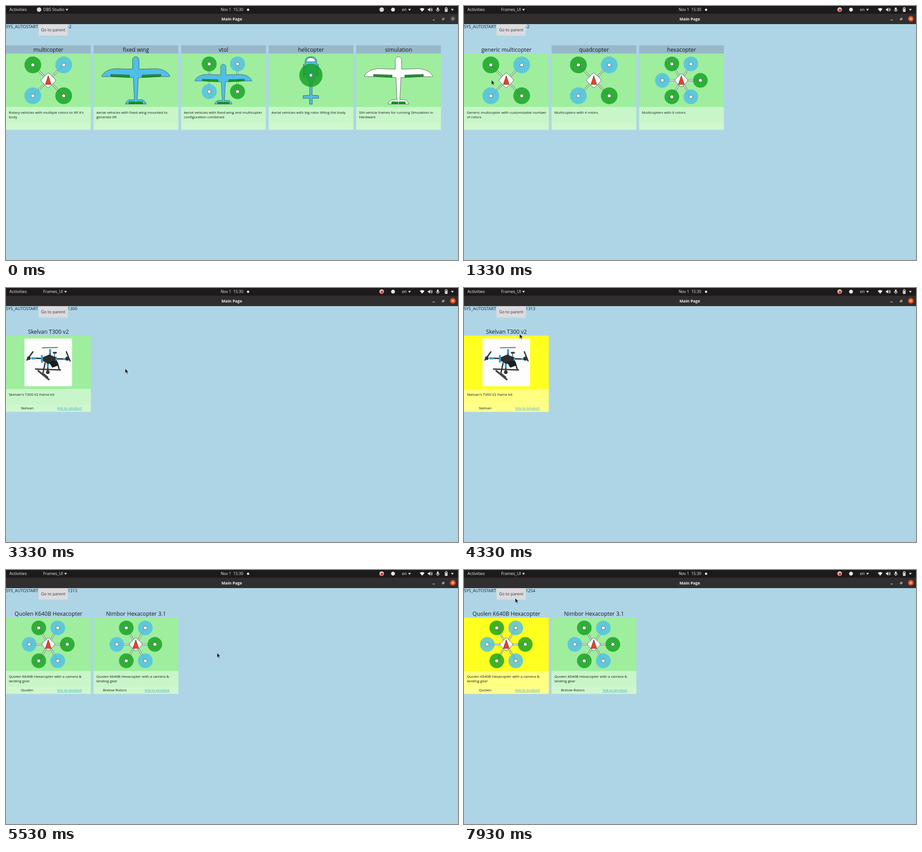
An HTML page for the animation above (8000 ms loop, 998 by 561 pixels).

```html
<!DOCTYPE html>
<html lang="en">
<head>
<meta charset="utf-8">
<title>Main Page</title>
<style>
html, body { margin: 0; width: 100%; height: 100%; overflow: hidden; background: #aed5e6; }
svg { display: block; width: 100vw; height: 100vh; }
text { font-family: "Open Sans", "Noto Sans", sans-serif; fill: #15191b; white-space: pre; }
.bar text { fill: #f0efee; }
.ink { stroke: #25332c; stroke-width: .7; stroke-linejoin: round; }
</style>
</head>
<body>
<svg id="stage" viewBox="0 0 998 561" preserveAspectRatio="none"></svg>
<script>
const LOOP = 8000, STEP = 1000 / 15;
const GREEN = '#16a020', BLUE = '#4fbfe8', LIME = '#9eee9e', YELLOW = '#ffff20';

const text = (x, y, size, str, attrs = '') =>
  `<text x="${x}" y="${y}" font-size="${size}" ${attrs}>${str}</text>`;
const centred = (x, y, size, str, attrs = '') => text(x, y, size, str, `text-anchor="middle" ${attrs}`);
const rect = (x, y, w, h, fill, attrs = '') =>
  `<rect x="${x}" y="${y}" width="${w}" height="${h}" fill="${fill}" ${attrs}/>`;
const circle = (x, y, r, fill, attrs = '') => `<circle cx="${x}" cy="${y}" r="${r}" fill="${fill}" ${attrs}/>`;
const path = (d, fill, attrs = '') => `<path d="${d}" fill="${fill}" ${attrs}/>`;
const group = (inner, attrs) => `<g ${attrs}>${inner}</g>`;
const arrowDown = x => path(`M${x - 3},6.5h6l-3,4z`, '#f0efee');

// Vehicle icons, centred on x = 0
const rotor = (x, y, r, fill) =>
  circle(x, y, r, fill, 'opacity=".81"') + circle(x, y, 3.9, '#fff', 'class="ink"');
const arm = (x1, y1, x2, y2) => {
  const d = `M${x1},${y1}L${x2},${y2}`;
  return path(d, 'none', 'stroke="#34503c" stroke-width="3.6"') +
    path(d, 'none', 'stroke="#e6f5e6" stroke-width="2.2"');
};

function copter(count) {
  const quad = count === 4, reach = quad ? 48.2 : 42, size = quad ? 18.5 : 16.2;
  let arms = '', rotors = '';
  for (let i = 0; i < count; i++) {
    const a = (i + (quad ? .5 : 0)) * 2 * Math.PI / count;
    const x = reach * Math.cos(a), y = 164.2 + reach * Math.sin(a);
    arms += arm(0, 164.2, x, y);
    rotors += rotor(x, y, size, i % 2 ? BLUE : GREEN);
  }
  const half = quad ? 12.3 : 11;
  const body = rect(-half, -half, 2 * half, 2 * half, '#fff', 'rx="3.5" class="ink" transform="rotate(45)"') +
    path('M0,-10.5L6.5,9H-6.5Z', '#f43c22', 'class="ink"');
  return arms + rotors + group(body, 'transform="translate(0 164.2)"');
}

function plane(fill) {
  const half = s => `<g transform="scale(${s} 1)">` +
    path('M14,152.5L55,151V155.5L14,157.5Z', GREEN, 'class="ink"') +
    path('M1,211.5H15V216H1Z', GREEN, 'class="ink"') + '</g>';
  return path('M0,112C4,112 7,115 7,120V139.5L42,138.5C58,138.5 69,144 75,154Q76,156 73,156L55,156L14,158H5.5L3,207H14' +
    'Q20,208.500 23,216.500H-23Q-20,208.500 -14,207H-3L-5.500,158H-14L-55,156H-73Q-76,156 -75,154' +
    'C-69,144 -58,138.500 -42,138.500L-7,139.500V120C-7,115 -4,112 0,112Z', fill, 'class="ink"') + half(1) + half(-1);
}

function vtol() {
  let arms = '', rotors = '';
  for (const x of [-31.3, 31.3]) {
    arms += arm(x, 128, x, 189);
    rotors += rotor(x, 128, 16.6, x < 0 ? GREEN : BLUE) + rotor(x, 189, 16.6, x < 0 ? BLUE : GREEN);
  }
  return arms + group(plane(BLUE), 'transform="translate(0 34.700) scale(.84)"') + rotors;
}

function helicopter() {
  const skid = x => path(`M${x},128V157M${x},135H0M${x},151H0`, 'none', 'stroke="#2f6f8c" stroke-width="1.800"');
  return skid(-16) + skid(16) +
    path('M-13,125C-13,115 -8,112 0,112S13,115 13,125V147C13,158 5,161 3,170L2.500,197L17,198V204L3,203.500V217H-3V203.500L-17,204V198L-2.500,197L-3,170C-5,161 -13,158 -13,147Z', BLUE, 'class="ink"') +
    path('M-10,123C-9,116 -5,114.500 0,114.500S9,116 10,123Z', '#fff', 'class="ink"') +
    circle(0, 153, 25.7, GREEN, 'opacity=".81"') + circle(0, 153, 3.7, '#fff', 'class="ink"');
}

function kitPhoto() {
  const line = (d, color, w) => path(d, 'none', `stroke="${color}" stroke-width="${w}" stroke-linecap="round"`);
  return rect(-52.5, 111.5, 105, 105.5, '#fdfdfd') +
    line('M-36,155L42,157M4,138V150M-1,160V184M-7,166L-12,189M20,165L24,179', '#33363b', 3) +
    line('M-36,155.500L-29,155.500M35,157H41M4,137V142M-1,165V173M-14,150V163M17,154V160', '#2ba6dc', 4.5) +
    line('M-13,132L20,131.500', '#7d8587', 2.5) +
    line('M-47,159L-34,141M40,141L48,161M-28,179L27,181', '#3b3a3c', 3) +
    line('M-22,183L1,202M-12,189L-2,197', '#4a4342', 4) +
    path('M-12,153L2,147L17,153L15,164L0,168L-12,161Z', '#2c2e32') +
    path('M1,163L19,160L22,171L9,176Z', '#1d1d20') +
    rect(10, 141, 9, 4, '#3c3f43', 'rx="2"') + line('M14,145V152', '#3c3f43', 1.5) +
    circle(-43, 155, 4, '#303236') + circle(42, 156, 4.5, '#303236') + circle(-1, 186, 4, '#303236');
}

// Frame browser pages; a card with an id is selectable and has no title band
const quadIcon = copter(4), hexIcon = copter(6);
const hexNote = ['Quolen K640B Hexacopter with a camera &amp;', 'landing gear'];
const pages = {
  root: [
    { title: 'multicopter', icon: quadIcon, note: ["Rotary vehicles with multiple rotors to lift it's", 'body'] },
    { title: 'fixed wing', icon: plane(BLUE), note: ['Aerial vehicles with fixed wing mounted to', 'generate lift'] },
    { title: 'vtol', icon: vtol(), note: ['Aerial vehicles with fixed wing and multicopter', 'configuration combined'] },
    { title: 'helicopter', icon: helicopter(), note: ['Aerial vehicles with big rotor lifting the body'] },
    { title: 'simulation', icon: plane('#fff'), note: ['SIH vehicle frames for running Simulation In', 'Hardware'] }
  ],
  multi: [
    { id: 1300, title: 'generic multicopter', icon: quadIcon, note: ['Generic multicopter with customizable number', 'of rotors'] },
    { title: 'quadcopter', icon: quadIcon, note: ['Multicopters with 4 rotors'] },
    { title: 'hexacopter', icon: hexIcon, note: ['Multicopters with 6 rotors'] }
  ],
  quad: [
    { id: 1313, title: 'Skelvan T300 v2', icon: kitPhoto(), note: ["Skelvan's T300 V2 frame kit"], maker: 'Skelvan' }
  ],
  hexa: [
    { id: 1254, title: 'Quolen K640B Hexacopter', icon: hexIcon, note: hexNote, maker: 'Quolen' },
    { id: 1532, title: 'Nimbor Hexacopter 3.1', icon: hexIcon, note: hexNote, maker: 'Brelow Rotors' }
  ]
};

function card({ id, title, icon, note, maker }, i) {
  const w = 187.2;
  return group(
    (id ? '' : rect(0, 86.7, w, 18.6, '#97b8c8')) +
    rect(0, 105.3, w, 168.2, LIME, id ? `data-id="${id}"` : '') +
    rect(0, 223, w, 50.5, '#fff', 'opacity=".44"') +
    rect(0, 257.5, w, 16, '#fff', 'opacity=".09"') +
    centred(w / 2, 100.8, 12.2, title) +
    group(icon, `transform="translate(${w / 2 - .3} 0)"`) +
    note.map((s, k) => text(6.2, 237.5 + 10 * k, 8, s)).join('') +
    (maker ? centred(46.8, 268.4, 8, maker) +
      centred(140.2, 268.4, 8, 'link to product', 'style="fill:#3fa3cf" text-decoration="underline"') : ''),
    `transform="translate(${i * 193.3} 0)"`);
}

function topBar() {
  const stroke = 'stroke="#f0efee" stroke-width="1.100"';
  return rect(0, 0, 998, 17, '#1d1a1c') + rect(0, 17, 998, 23, '#312e2f') +
    text(7.5, 11.3, 9.4, 'Activities') +
    group(circle(73, 8, 5, '#d8d6d6') + text(82, 11.3, 9, 'OBS Studio') + arrowDown(134.5), 'id="recorder"') +
    group(text(82, 11.3, 9, 'Frames_UI') + arrowDown(131.5), 'id="viewer"') +
    text(474, 11.3, 8.7, 'Nov 1  15:30') + circle(534.5, 8.2, 2.5, '#f0efee') +
    circle(829.5, 8, 5, '#d8d6d6') + circle(830, 9, 3, '#e0302c', 'id="recording"') +
    circle(854.5, 8, 4.3, '#e8e6e6') +
    text(874.3, 11.3, 9, 'en') + arrowDown(891) +
    path('M913.500,6.500Q919,2.500 924,6.500L919,12.500Z', '#f0efee') +
    path('M931.500,6.500h2l3,-3v9l-3,-3h-2z', '#f0efee') +
    path('M938,5.500q2,2.500 0,5M939.500,4q3.500,4 0,8', 'none', stroke) +
    rect(951.6, 3.2, 3.6, 6, '#f0efee', 'rx="1.800"') +
    path('M950,7.500q0,3.500 3.400,3.500t3.400,-3.500M953.400,11v2', 'none', stroke) +
    rect(969.5, 4, 5, 8.5, 'none', `rx="1" ${stroke}`) + rect(971, 2.5, 2, 1.5, '#f0efee') +
    rect(970.5, 6, 3, 6, '#f0efee') + arrowDown(985.5) +
    centred(498.5, 31.7, 8.8, 'Main Page', 'font-weight="700"') +
    group(path('M942,31h4.500', 'none', stroke) +
      path('M963,28.500h3v2.500h-3zM964.500,28.500v-1.800h3v3h-1.500', 'none', 'stroke="#f0efee" stroke-width=".8"') +
      circle(986.6, 28.2, 6.1, '#e9541f', 'id="close"') +
      path('M984.500,26.100l4.200,4.200m0,-4.200l-4.200,4.200', 'none', stroke), 'id="controls"');
}

const stage = document.getElementById('stage');
stage.innerHTML = rect(0, 0, 998, 561, '#aed5e6') + group(topBar(), 'class="bar"') +
  text(0, 48.6, 9.3, 'SYS_AUTOSTART') +
  rect(72, 40, 64.3, 25.3, '#dcdce0') + centred(104.2, 55.8, 9.1, 'Go to parent', 'style="fill:#333639"') +
  text(136.3, 48.6, 9.1, '', 'id="frameId"') +
  Object.entries(pages).map(([name, cards]) => group(cards.map(card).join(''), `id="${name}"`)).join('') +
  path('M0,0V10.300L2.400,8.200L4.200,12L5.900,11.200L4.200,7.600H7.300Z', '#151515', 'id="cursor" stroke="#e8eef0" stroke-width=".6"');

const el = id => document.getElementById(id);
const show = (id, on) => el(id).setAttribute('display', on ? 'inline' : 'none');
const selectable = [...stage.querySelectorAll('[data-id]')];

const visits = [[0, 'root'], [930, 'multi'], [3260, 'quad'], [4790, 'multi'], [5390, 'hexa']];
const picks = [[0, -2], [2260, 1300], [4060, 1313], [6590, 1532], [7390, 1254]];
const moves = [
  [60, 968, 360], [270, 700, 270], [530, 200, 180], [730, 44, 150], [870, 60, 164], [1330, 60, 163],
  [1530, 95, 185], [1730, 400, 200], [1870, 508, 205], [2070, 200, 170], [2200, 100, 160], [2330, 100, 165],
  [2600, 179, 310], [2670, 150, 300], [2800, 56, 200], [2930, 380, 118], [3000, 496, 150], [3130, 290, 175],
  [3270, 290, 175], [3600, 150, 190], [3800, 105, 170], [4070, 105, 170], [4330, 123, 102], [4600, 104, 50],
  [4930, 106, 44], [5270, 430, 170], [5400, 466, 183], [5730, 466, 183], [5870, 330, 236], [6000, 40, 96],
  [6070, 11, 150], [6270, 11, 150], [6530, 262, 190], [6800, 267, 212], [7070, 267, 212], [7330, 95, 170],
  [7530, 95, 170], [7930, 113, 62]
];

const latest = (list, t) => list.filter(e => e[0] <= t).pop()[1];

function pointerAt(t) {
  const next = moves.findIndex(m => m[0] > t);
  if (next < 1) return moves[next < 0 ? moves.length - 1 : 0].slice(1);
  const [t0, x0, y0] = moves[next - 1], [t1, x1, y1] = moves[next];
  const k = (t - t0) / (t1 - t0);
  return [x0 + (x1 - x0) * k, y0 + (y1 - y0) * k];
}

function render(time) {
  const t = Math.floor((time % LOOP + 4) / STEP) * STEP;
  const page = latest(visits, t), pick = latest(picks, t), focused = t >= 930;
  for (const name in pages) show(name, name === page);
  selectable.forEach(r => r.setAttribute('fill', +r.dataset.id === pick ? YELLOW : LIME));
  el('frameId').textContent = pick;
  show('recorder', !focused);
  show('viewer', focused);
  show('recording', t > 60);
  el('close').setAttribute('fill', focused ? '#e9541f' : '#504d4e');
  el('controls').setAttribute('opacity', focused ? 1 : .8);
  show('cursor', t > 60);
  el('cursor').setAttribute('transform', `translate(${pointerAt(t)})`);
}

const start = performance.now();
function tick() {
  render(performance.now() - start);
  requestAnimationFrame(tick);
}
tick();
</script>
</body>
</html>
```
